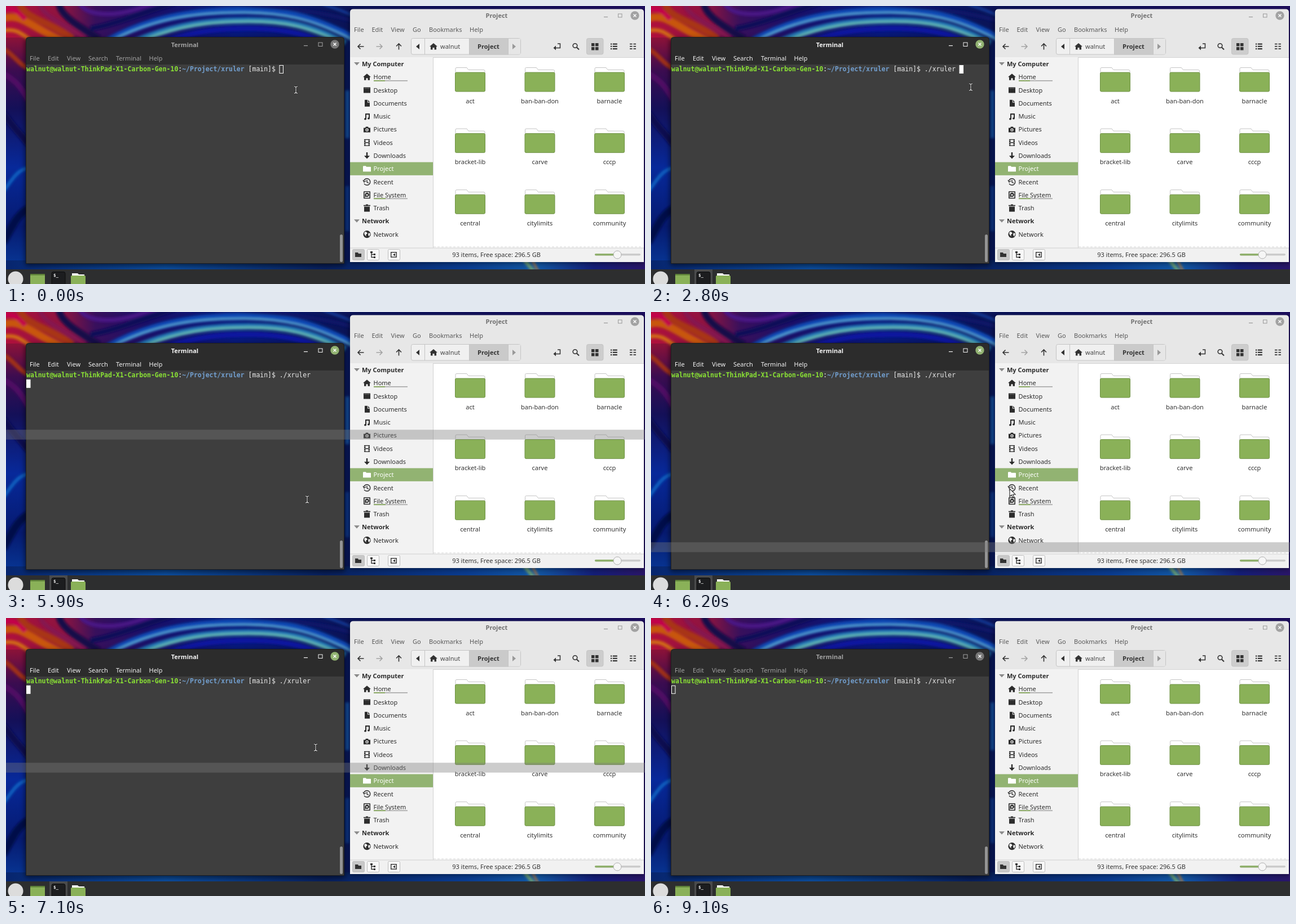
Recreate the animation shown at these times as an HTML page. Size 1133 px wide and 494 px high, loop 9.2 s.

```html
<!DOCTYPE html>
<html lang="en">
<head>
<meta charset="utf-8">
<title>Screen ruler</title>
<style>
html, body { margin: 0; width: 100%; height: 100%; overflow: hidden; background: #0a1a60; }
svg { display: block; width: 100vw; height: 100vh; }
text { font: 11px "Noto Sans", "Open Sans", sans-serif; white-space: pre; }
.b { font-weight: 700; }
.mono { font: 11.47px "DejaVu Sans Mono", monospace; }
.mono .b { font-weight: 700; }
</style>
</head>
<body>
<svg id="stage" viewBox="0 0 1133 494" preserveAspectRatio="none">
  <defs>
    <filter id="soft" x="-10%" y="-10%" width="120%" height="120%"><feGaussianBlur stdDeviation="2"/></filter>
    <filter id="shade" x="-10%" y="-10%" width="120%" height="120%"><feGaussianBlur stdDeviation="4"/></filter>
    <linearGradient id="sky">
      <stop offset="0" stop-color="#b0103c"/><stop offset=".09" stop-color="#8c1440"/>
      <stop offset=".14" stop-color="#38105c"/><stop offset=".22" stop-color="#1a0f66"/>
      <stop offset=".36" stop-color="#07197c"/><stop offset=".52" stop-color="#0a1458"/>
      <stop offset="1" stop-color="#1c0d5e"/>
    </linearGradient>
    <linearGradient id="side" x2="0" y2="1">
      <stop offset="0" stop-color="#8c1238"/><stop offset=".14" stop-color="#3c0c50"/>
      <stop offset=".3" stop-color="#141058"/><stop offset=".55" stop-color="#07299a"/>
      <stop offset=".8" stop-color="#061a70"/><stop offset="1" stop-color="#083c9c"/>
    </linearGradient>
    <linearGradient id="low">
      <stop offset="0" stop-color="#07256e"/><stop offset=".25" stop-color="#0c4ea0"/>
      <stop offset=".5" stop-color="#08205e"/><stop offset=".72" stop-color="#0a3c90"/>
      <stop offset=".83" stop-color="#1258a4"/><stop offset=".92" stop-color="#141e78"/>
      <stop offset="1" stop-color="#2a1668"/>
    </linearGradient>
  </defs>
  <g id="desk"></g>
  <g id="term"></g>
  <g id="files"></g>
  <g id="bar"></g>
  <rect id="band" width="1133" height="17.5" fill="#7a7a7a" opacity=".38"/>
  <g id="mouse">
    <g id="beam" fill="none">
      <path d="M-3-6Q0-6 0-4V4Q0 6-3 6M3-6Q0-6 0-4V4Q0 6 3 6" stroke="#111" stroke-width="2.6"/>
      <path d="M-3-6Q0-6 0-4V4Q0 6-3 6M3-6Q0-6 0-4V4Q0 6 3 6" stroke="#eee" stroke-width="1.1"/>
    </g>
    <path id="arrow" d="M0 0V14L3.3 11L5.6 16L7.8 15L5.6 10.2H10Z" fill="#fff" stroke="#222" stroke-width="1.1"/>
  </g>
</svg>
<script>
const $ = id => document.getElementById(id);
const LOOP = 9200, USER = "walnut";

function add(parent, tag, attrs, content) {
  const el = document.createElementNS("http://www.w3.org/2000/svg", tag);
  for (const k in attrs) el.setAttribute(k, attrs[k]);
  if (content !== undefined) el.textContent = content;
  parent.appendChild(el);
  return el;
}
const rect = (p, x, y, width, height, fill, more) =>
  add(p, "rect", { x, y, width, height, fill, ...more });
const fillPath = (p, d, fill, more) => add(p, "path", { d, fill, ...more });
const line = (p, d, stroke, width = 1.5, more) =>
  add(p, "path", { d, stroke, "stroke-width": width, fill: "none", ...more });
const label = (p, x, y, s, fill, more) => add(p, "text", { x, y, fill, ...more }, s);
const disc = (p, cx, cy, r, fill, more) => add(p, "circle", { cx, cy, r, fill, ...more });
const mid = { "text-anchor": "middle" };
const midBold = { ...mid, class: "b" };

function drawDesk(g) {
  rect(g, 0, 0, 1133, 494, "url(#sky)");
  rect(g, 0, 56, 60, 420, "url(#side)");
  rect(g, 590, 60, 30, 400, "#0a1a64");
  rect(g, 0, 452, 1133, 18, "url(#low)");
  const s = add(g, "g", { filter: "url(#soft)" });
  const swirl = (d, color, w) => line(s, d, color, w);
  swirl("M-5 22C25 12 40 35 100 62", "#c8560e", 13);
  swirl("M25-5C30 22 75 26 118 58", "#a83414", 12);
  swirl("M-5 44C20 38 30 52 60 72", "#d06a12", 7);
  swirl("M60-5C62 16 95 26 140 58", "#851850", 8);
  swirl("M-5 6C12 2 22 10 34 24", "#c4004c", 8);
  swirl("M94-5C96 16 125 34 165 58", "#160848", 12);
  swirl("M130-6C140 16 185 20 230 6S260-6 280-8", "#4a1484", 8);
  swirl("M150 40C190 34 240 12 300-5", "#0c0c58", 9);
  swirl("M180 62C265 16 345 8 425 8S555 24 625 62", "#0a48b4", 12);
  swirl("M186 62C270 18 350 11 425 12S550 26 618 62", "#58a8d4", 3.5);
  swirl("M225 64C300 32 360 25 430 25S540 34 602 66", "#2078b4", 10);
  swirl("M236 64C306 34 365 28 430 28S535 37 596 66", "#62b8b4", 5);
  swirl("M270 66C340 43 380 40 430 40S520 46 570 66", "#0a18a0", 9);
  swirl("M330-4C420-2 520 0 615 26", "#0c1468", 7);
  swirl("M560-4C580 4 600 8 620 20", "#1840a0", 4);
  swirl("M-5 76C12 84 22 104 42 112", "#a03018", 8);
  swirl("M-5 120C14 130 26 142 40 168", "#501064", 10);
  swirl("M-5 190C12 215 24 225 40 246", "#0a1050", 12);
  swirl("M-5 330C10 310 20 290 40 288", "#1060c0", 6);
  swirl("M-5 420C12 390 20 370 40 360", "#050f48", 14);
  swirl("M605 150V235", "#1658ae", 7);
  swirl("M605 320V400", "#0c3c98", 7);
  swirl("M918 450L936 472", "#6a9c72", 6);
  swirl("M932 450L944 472", "#c07830", 3);
}

function drawTerm(g) {
  rect(g, 33, 57, 570, 405, "#000", { rx: 6, opacity: .5, filter: "url(#shade)" });
  fillPath(g, "M35 458V61Q35 55 41 55H594Q600 55 600 61V458Z", "#1e1e1e");
  fillPath(g, "M36 104V61Q36 56 41 56H594Q599 56 599 61V104Z", "#2c2c2c");
  rect(g, 36, 104, 563, 353, "#3e3e3e");
  rect(g, 592, 406, 5, 49, "#949494", { rx: 2.5 });
  const chrome = add(g, "g", {});
  label(chrome, 317, 72.5, "Terminal", "currentColor", midBold);
  [["File", 42], ["Edit", 74], ["View", 108], ["Search", 146], ["Terminal", 195], ["Help", 253.5]]
    .forEach(([s, x]) => label(chrome, x, 96.5, s, "currentColor"));
  line(chrome, "M528 70.5H535", "currentColor", 1.2);
  rect(chrome, 554, 65, 7, 6.5, "none", { stroke: "currentColor" });
  const close = disc(g, 583, 68, 7.7, "#777");
  line(g, "M580.5 65.5L585.5 70.5M585.5 65.5L580.5 70.5", "#fff", 1.4);
  const t = add(g, "text", { x: 36, y: 116, class: "mono", fill: "#ececec" });
  add(t, "tspan", { fill: "#8ae234", class: "b" }, USER + "@" + USER + "-ThinkPad-X1-Carbon-Gen-10");
  add(t, "tspan", {}, ":");
  add(t, "tspan", { fill: "#729fcf", class: "b" }, "~/Project/xruler");
  add(t, "tspan", {}, " [main]$ ");
  const typed = add(t, "tspan", {}, "");
  const cursor = rect(g, 0, 0, 6.5, 14, "#fff", { stroke: "#fff" });
  return { chrome, close, typed, cursor };
}

function folder(g, x, y) {
  fillPath(g, `M${x - 26} ${y + 12}V${y + 1}Q${x - 26} ${y - 1} ${x - 24} ${y - 1}H${x - 6}L${x - 3} ${y + 3}H${x + 24}Q${x + 26} ${y + 3} ${x + 26} ${y + 5}V${y + 12}Z`,
    "#fff", { stroke: "#c4c4c4" });
  rect(g, x - 26.5, y + 7.5, 53, 34, "#8ab158", { rx: 2, stroke: "#6f9244" });
}

// Sidebar glyphs, each centred on 0,0
const glyphs = [
  "M0-6L7 0H5V5.5H1.5V2H-1.5V5.5H-5V0H-7Z",
  "M-6-5H6V5H-6ZM-5-3.4V-3H5V-3.4Z",
  "M-4-6H1V-1H5V6H-4ZM2-6L5-2H2Z",
  "M-3-5H5V4A2 1.7 0 1 1 3 2V-3H-1V5A2 1.7 0 1 1-3 3Z",
  "M-6-3H-3L-2-5H2L3-3H6V5H-6ZM0-2A2.7 2.7 0 1 0 .1-2ZM0-.5A1.3 1.3 0 1 1-.1-.5Z",
  "M-5-6H5V6H-5ZM-2.5-4.8V-.7H2.5V-4.8ZM-2.5.7V4.8H2.5V.7ZM-4.3-4V-2.6H-3.3V-4ZM-4.3-.6V.8H-3.3V-.6ZM-4.3 2.8V4.2H-3.3V2.8ZM3.3-4V-2.6H4.3V-4ZM3.3-.6V.8H4.3V-.6ZM3.3 2.8V4.2H4.3V2.8Z",
  "M-1.2-6H1.2V0H5L0 5.5L-5 0H-1.2Z",
  "M-7-4Q-7-5-6-5H-2L-1-3.5H6Q7-3.5 7-2.5V5H-7Z",
  "", 
  "M-5-6.5H5Q6-6.5 6-5.5V5.5Q6 6.5 5 6.5H-5Q-6 6.5-6 5.5V-5.5Q-6-6.5-5-6.5ZM-4.4-5V5H4.4V-5ZM0-4A3.7 3.7 0 1 1-1.5 3L-3.6 4V0A3.7 3.7 0 0 1 0-4ZM0-1.6A1.6 1.6 0 1 0 .1-1.6Z",
  "M-2-6.5H2V-5.3H6V-3.5H-6V-5.3H-2ZM-5-2.5H5V6.5H-5Z"
];

function drawSidebar(g) {
  const ink = "#2c2c2c", rowY = i => 103 + 23.28 * i;
  const names = ["Home", "Desktop", "Documents", "Music", "Pictures", "Videos",
    "Downloads", "Project", "Recent", "File System", "Trash"];
  rect(g, 610, 91, 147, 339, "#f2f2f2");
  rect(g, 610, 277.5, 147, 23.3, "#92b372");
  [["My Computer", 0], ["Network", 12]].forEach(([s, i]) => {
    const y = rowY(i);
    fillPath(g, `M617 ${y - 3}H627L622 ${y + 2.5}Z`, "#8a8a8a");
    label(g, 631, y + 4, s, ink, { class: "b" });
  });
  names.forEach((s, i) => {
    const y = rowY(i + 1), c = s === "Project" ? "#fff" : ink;
    const icon = add(g, "g", { transform: `translate(640 ${y})` });
    if (s === "Recent") line(icon, "M-5.5-2A5.8 5.8 0 1 1-5 3M-7-3L-5 .5L-2-2M0-3.5V.5L3 2", c, 1.4);
    else fillPath(icon, glyphs[i], c, { "fill-rule": "evenodd" });
    label(g, 651.5, y + 4, s, c);
    if (s === "Home" || s === "File System") {
      rect(g, 652, y + 5.7, 60, 1.6, "#a6a6a6");
      rect(g, 652, y + 5.7, s === "Home" ? 20 : 21, 1.6, "#7ba04c");
    }
  });
  const y = rowY(13);
  disc(g, 640, y, 6.6, ink);
  fillPath(g, `M635 ${y - 3}L638 ${y - 5}L641 ${y - 2}L638 ${y + 1}L639 ${y + 4}L636 ${y + 1}ZM643 ${y - 3}L646 ${y - 1}L644 ${y + 4}L642 ${y + 1}Z`, "#f2f2f2");
  label(g, 651.5, y + 4, "Network", ink);
  line(g, "M757.5 91V430", "#d2d2d2", 1);
}

function drawToolbar(g) {
  const ink = "#333", edge = "#c4c4c4", box = { stroke: edge };
  const arrow = (x, turn, c) =>
    line(g, "M5.5 0H-5M-.5-4.5L-5 0L-.5 4.5", c, 1.6, { transform: `translate(${x} 72) rotate(${turn})` });
  arrow(629, 0, ink);
  arrow(662, 180, "#a4a4a4");
  arrow(696.5, 90, ink);
  rect(g, 718.5, 57.5, 194, 28.5, "#f0f0f0", { rx: 3, ...box });
  rect(g, 821.5, 57.5, 69, 28.5, "#cacaca", box);
  rect(g, 890.5, 58, 21.5, 27.5, "#e6e6e6");
  line(g, "M742.5 58V86M890.5 58V86", edge, 1);
  fillPath(g, "M733 67V77L727 72Z", ink);
  fillPath(g, "M898 67V77L904 72Z", "#999");
  fillPath(g, glyphs[0], ink, { transform: "translate(758 72)" });
  label(g, 770, 76, USER, "#444");
  label(g, 855.5, 76, "Project", "#333", midBold);
  line(g, "M978 67H982.5V74.5H973", ink, 1.5);
  fillPath(g, "M975 70.5V78.5L970.5 74.5Z", ink);
  add(g, "circle", { cx: 1009, cy: 70.5, r: 3.8, fill: "none", stroke: ink, "stroke-width": 1.6 });
  line(g, "M1012 73.5L1016 77.5", ink, 2);
  rect(g, 1029.5, 57.5, 29.5, 28.5, "#cdcdcd", { rx: 3, ...box });
  for (const x of [1038, 1045]) for (const y of [66, 73]) rect(g, x, y, 5.5, 5.5, ink);
  for (const y of [66.5, 70.7, 75]) {
    rect(g, 1072, y, 2.2, 2.2, ink);
    rect(g, 1075.8, y, 8, 2.2, ink);
    for (const x of [1106, 1112.5]) rect(g, x, y + .2, 4.5, 1.7, ink);
  }
}

function drawStatus(g) {
  rect(g, 610, 430, 521, 25, "#f1f1f1");
  line(g, "M610 430H1131", "#d0d0d0", 1);
  [614, 640, 677].forEach((x, i) =>
    rect(g, x + .5, 432.5, 21, 19, i ? "#f8f8f8" : "#c8c8c8", { rx: 2, stroke: "#bdbdbd" }));
  fillPath(g, "M619 438H624L625 440H630V446H619Z", "#333");
  line(g, "M648 437V446.5H653M648 441.5H653", "#333", 1.4);
  fillPath(g, "M646 436H650V439H646ZM652 440H655V443H652ZM652 445H655V448H652Z", "#333");
  rect(g, 682.7, 437.7, 9.5, 8.5, "none", { stroke: "#333", "stroke-width": 1.4 });
  fillPath(g, "M690 439.5V444.5L686 442Z", "#333");
  label(g, 869.5, 446.3, "93 items, Free space: 296.5 GB", "#333", mid);
  rect(g, 1044, 440, 81, 3.6, "#cbcbcb", { rx: 1.8 });
  rect(g, 1044, 440, 40, 3.6, "#8fb06c", { rx: 1.8 });
  disc(g, 1084, 442, 7, "#f6f6f6", { stroke: "#b0b0b0" });
}

function drawFiles(g) {
  rect(g, 608, 8, 525, 450, "#000", { rx: 5, opacity: .4, filter: "url(#shade)" });
  fillPath(g, "M610 455V11Q610 5.5 616 5.5H1125Q1131 5.5 1131 11V455Z", "#e7e7e7");
  label(g, 870, 21.3, "Project", "#707070", midBold);
  line(g, "M1060 19.5H1067", "#999", 1.2);
  rect(g, 1085.5, 14, 6.5, 6, "none", { stroke: "#999" });
  disc(g, 1115, 17, 7.7, "#a2a2a2");
  line(g, "M1112.5 14.5L1117.5 19.5M1117.5 14.5L1112.5 19.5", "#fff", 1.4);
  [["File", 617], ["Edit", 648.5], ["View", 682.5], ["Go", 721], ["Bookmarks", 750], ["Help", 822]]
    .forEach(([s, x]) => label(g, x, 46, s, "#585858"));
  drawToolbar(g);
  rect(g, 757, 91, 374, 339, "#fff");
  line(g, "M610 91.5H1131", "#d2d2d2", 1);
  drawSidebar(g);
  ["act", "ban-ban-don", "barnacle", "bracket-lib", "carve", "cccp", "central", "citylimits", "community"]
    .forEach((s, i) => {
      const x = 823 + 123.5 * (i % 3), y = 110.5 + 108.6 * Math.floor(i / 3);
      folder(g, x, y);
      label(g, x, y + 62, s, "#333", mid);
    });
  line(g, "M758 428H1129", "#d6d6d6", 1, { "stroke-dasharray": "4 3" });
  drawStatus(g);
}

function drawBar(g) {
  rect(g, 0, 468, 1133, 26, "#2d2e2f");
  const active = rect(g, 77, 468, 32, 26, "#4a4b4c");
  disc(g, 17, 485, 13.5, "#dcdcdc");
  rect(g, 43, 476, 26, 20, "#8ab158", { rx: 1 });
  rect(g, 43, 476, 26, 2.5, "#5d7f38");
  rect(g, 81, 472.5, 24, 24, "#1c1d1f", { rx: 3, stroke: "#0c0c0c" });
  label(g, 84, 481, "$_", "#f4f4f4", { style: "font: 700 7.5px 'DejaVu Sans Mono', monospace" });
  fillPath(g, "M117 480V475H127L129 477H139V480Z", "#fff");
  rect(g, 115, 479, 26, 18, "#8ab158", { rx: 1.5 });
  return active;
}

drawDesk($("desk"));
const term = drawTerm($("term"));
drawFiles($("files"));
const active = drawBar($("bar"));

// Pointer stops: tenths of a second, x, y
const stops = [
  [0, 514, 149], [21, 514, 149], [22, 506, 157], [24, 476, 187], [25, 476, 187], [26, 492, 200],
  [28, 567, 144], [29, 569, 135], [31, 558, 175], [33, 550, 198], [47, 550, 198], [48, 548, 222],
  [50, 544, 325], [51, 541, 340], [53, 538, 215], [55, 536, 135], [57, 535, 178], [58, 535, 218],
  [59, 534, 333], [60, 558, 412], [61, 600, 418], [63, 672, 210], [64, 680, 108], [65, 676, 150],
  [66, 669, 167], [67, 650, 205], [68, 620, 335], [69, 582, 420], [70, 556, 266], [71, 549, 230],
  [72, 543, 140], [74, 543, 140], [75, 470, 75], [76, 390, 49], [77, 300, 150], [78, 215, 209],
  [80, 215, 209], [81, 190, 105], [82, 174, 21], [83, 166, 17], [85, 172, 5], [87, 190, -30], [92, 190, -30]
];

function pointer(tick) {
  let i = 1;
  while (i < stops.length - 1 && stops[i][0] < tick) i++;
  const [t0, x0, y0] = stops[i - 1], [t1, x1, y1] = stops[i];
  const k = Math.min(1, Math.max(0, (tick - t0) / (t1 - t0)));
  return [x0 + (x1 - x0) * k, y0 + (y1 - y0) * k];
}

function cursorOn(t) {
  if (t < 1200) return t < 1000;
  if (t < 4200) return t < 2000 || (t >= 2600 && t < 3200) || t >= 3900;
  return t < 4300 || Math.floor((t - 4300) / 600) % 2 === 0;
}

const show = (el, on) => el.setAttribute("visibility", on ? "inherit" : "hidden");

function render(t) {
  const tick = Math.floor(t / 100);
  const focused = t >= 400 && t < 9100, running = t >= 4200;
  term.chrome.style.color = focused ? "#f4f4f4" : "#a2a2a2";
  term.close.setAttribute("fill", focused ? "#92b372" : "#777");
  show(active, t >= 400);

  const typed = t < 1400 ? "" : t < 1500 ? "./x" : "./xruler ";
  term.typed.textContent = typed;
  term.cursor.setAttribute("x", running ? 36.5 : 485 + typed.length * 6.9);
  term.cursor.setAttribute("y", running ? 120.3 : 105.5);
  term.cursor.setAttribute("fill", focused ? "#fff" : "none");
  show(term.cursor, !focused || cursorOn(t));

  const [x, y] = pointer(tick);
  const inTerm = x > 36 && x < 592 && y > 104 && y < 457;
  $("mouse").setAttribute("transform", `translate(${x} ${y})`);
  $("mouse").setAttribute("visibility",
    (t >= 1400 && t < 2200) || (t >= 4200 && t < 4800) || t >= 8800 ? "hidden" : "visible");
  show($("beam"), inTerm);
  show($("arrow"), !inTerm);

  // The ruler trails the pointer by one tick
  const top = t < 4800 ? 329.5 : pointer(tick - 1)[1] - 8.8;
  $("band").setAttribute("y", top);
  show($("band"), running && t < 8900);
}

function loop(now) {
  render(now % LOOP);
  requestAnimationFrame(loop);
}
render(0);
requestAnimationFrame(loop);
</script>
</body>
</html>
```
